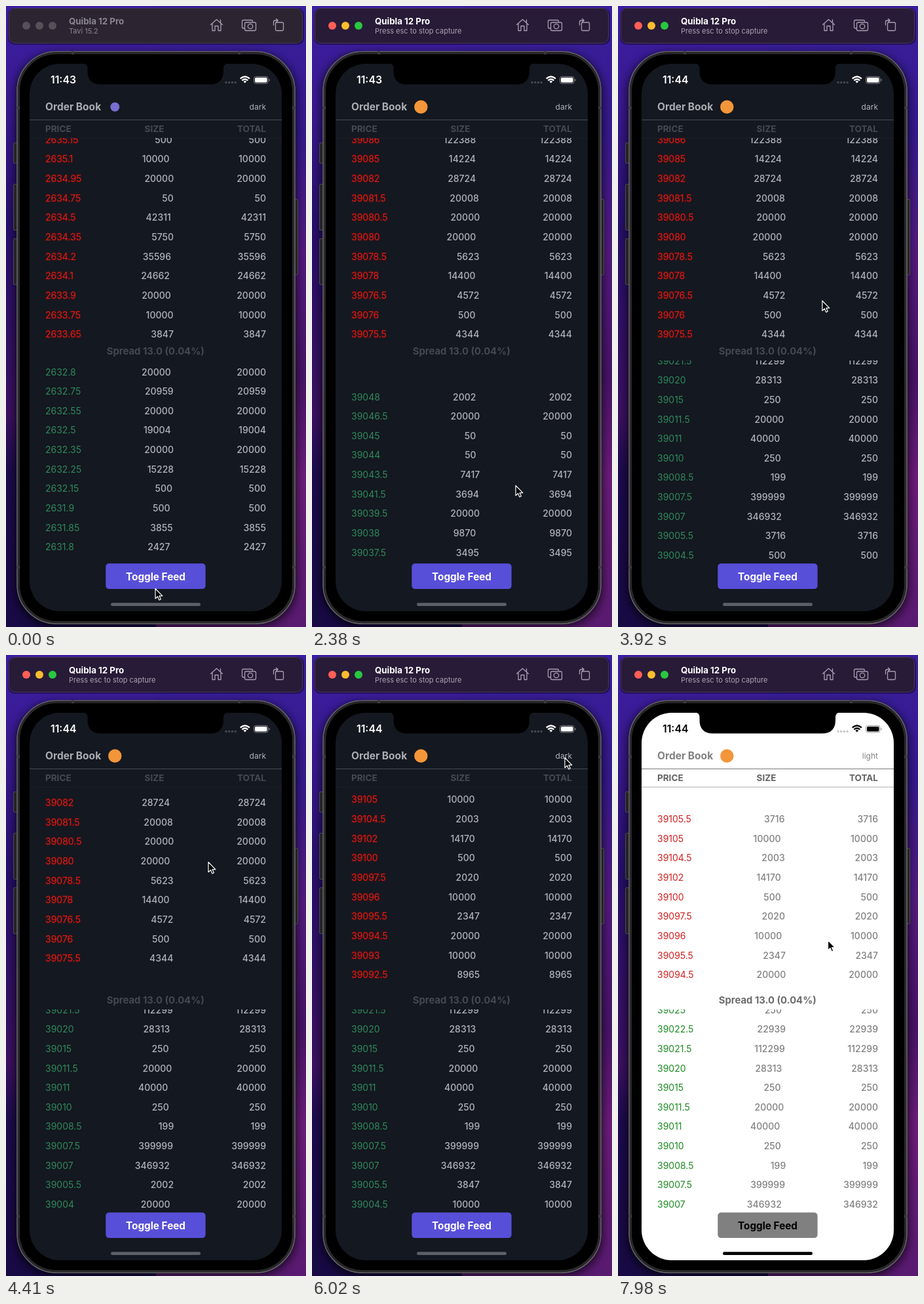
These frames come from a looping animation (458x946 px, 8 s). An HTML page:

```html
<!DOCTYPE html>
<html lang="en">
<head>
<meta charset="utf-8">
<title>Order Book</title>
<style>
  html, body { margin: 0; width: 100%; height: 100%; overflow: hidden; background: #160b3c; }
  svg { display: block; width: 458px; height: 946px; font-family: Inter, Roboto, "Liberation Sans", sans-serif; }
  #app {
    --bg: #141820; --title: #abadb2; --label: #454954; --value: #b1b3b9; --spread: #454851;
    --ask: #ec1a10; --bid: #2f8a5b; --line: #474b55; --line2: #1c202b; --status: #fff;
    --dots: #454850; --home: #5d6067; --btn: #584fd9; --btnText: #fff; --mode: #b1b3b9; --batt: #80848b;
  }
  #app.light {
    --bg: #fff; --title: #808080; --label: #626464; --value: #818181; --spread: #6c6c6c;
    --ask: #d3201e; --bid: #1d8a22; --line: #777b79; --line2: #a9aeab; --status: #000;
    --dots: #c8c8c8; --home: #000; --btn: #808080; --btnText: #000; --mode: #818181; --batt: #999;
  }
  .bold { font-weight: 700; }
  .label { font-size: 13.5px; font-weight: 700; fill: var(--label); }
  .row { font-size: 14px; font-weight: 500; fill: var(--value); }
  .price { font-weight: 400; }
  #asks .price { fill: var(--ask); }
  #bids .price { fill: var(--bid); }
  #app:not(.light) #asks .price { paint-order: stroke; stroke: #f00; stroke-opacity: .06; stroke-width: 4px; stroke-linejoin: round; }
  .end { text-anchor: end; }
  .mid { text-anchor: middle; }
  .icon { fill: none; stroke: #a79eb2; stroke-width: 1.3; stroke-linejoin: round; stroke-linecap: round; }
</style>
</head>
<body>
<svg viewBox="0 0 458 946">
  <defs>
    <linearGradient id="left" x2="0" y2="1">
      <stop offset="0" stop-color="#3b1ea2"/><stop offset=".16" stop-color="#3a1990"/>
      <stop offset=".35" stop-color="#260f6a"/><stop offset=".66" stop-color="#3c1162"/>
      <stop offset=".75" stop-color="#1c0b4e"/><stop offset="1" stop-color="#170a44"/>
    </linearGradient>
    <linearGradient id="right" x2="0" y2="1">
      <stop offset="0" stop-color="#391e9c"/><stop offset=".2" stop-color="#351a8e"/>
      <stop offset=".4" stop-color="#531a7e"/><stop offset=".6" stop-color="#481468"/>
      <stop offset=".76" stop-color="#6c1d7b"/><stop offset="1" stop-color="#581a70"/>
    </linearGradient>
    <clipPath id="askClip"><rect x="36" y="201" width="385" height="309"/></clipPath>
    <clipPath id="bidClip"><rect x="36" y="540" width="385" height="309.5"/></clipPath>
    <filter id="blur" x="-20%" y="-20%" width="140%" height="140%"><feGaussianBlur stdDeviation="7"/></filter>
  </defs>

  <rect width="229" height="946" fill="url(#left)"/>
  <rect x="229" width="229" height="946" fill="url(#right)"/>
  <rect x="14" y="72" width="430" height="874" rx="60" opacity=".65" filter="url(#blur)"/>

  <!-- window bar -->
  <rect x="3" y="3" width="452" height="56" rx="10" opacity=".4"/>
  <rect id="bar" x="4.500" y="3.500" width="448" height="53" rx="9.500" stroke="#46384f"/>
  <g id="lights"><circle cx="31" cy="30" r="6"/><circle cx="51" cy="30" r="6"/><circle cx="71" cy="30" r="6"/></g>
  <text id="device" class="bold" x="96" y="28" font-size="13.300">Quibla 12 Pro</text>
  <text id="hint" x="96" y="42" font-size="11"></text>
  <g class="icon">
    <path d="M312.500 28.500 321.500 20.500 330.500 28.500M327.500 21V25.500M315 27V37.500H319V30.500H324V37.500H328V27"/>
    <path d="M364 34H362.500Q360.500 34 360.500 32V23.500Q360.500 21.500 362.500 21.500H374.500Q376.500 21.500 376.500 23.500"/>
    <rect x="364.500" y="25" width="17" height="12.500" rx="2"/>
    <circle cx="373" cy="31" r="3.700"/>
    <rect x="411.500" y="25" width="12" height="12.500" rx="1.500"/>
    <path d="M408.500 29V24.500Q408.500 22 411 22H415M412.500 19.500 415.200 22 412.500 24.500"/>
  </g>

  <!-- handset -->
  <g fill="#242326" stroke="#4b494e">
    <rect x="11.500" y="208.500" width="7" height="31" rx="1.500"/>
    <rect x="11.500" y="271.500" width="7" height="70" rx="1.500"/>
    <rect x="11.500" y="354.500" width="7" height="70" rx="1.500"/>
    <rect x="438.500" y="294.500" width="7" height="115" rx="1.500"/>
  </g>
  <rect x="17" y="69.500" width="424" height="871.500" rx="60" stroke="#68686a" stroke-width="1.600"/>
  <rect x="19.500" y="72" width="419" height="866.500" rx="57.500" stroke="#29292b" stroke-width="3"/>
  <path d="M16.500 155H21M437 155H441.500M16.500 855H21M437 855H441.500M102 69V73.500M356 69V73.500" stroke="#3c3c3e" stroke-width="4"/>

  <g id="app">
    <rect x="36" y="88" width="385" height="834" rx="46" fill="var(--bg)"/>
    <path d="M118 87.500Q124.500 88 124.500 95V99Q124.500 119.500 145 119.500H311.500Q332 119.500 332 99V95Q332 88 338.500 87.500Z"/>
    <text id="clock" x="68" y="118" font-size="15.800" font-weight="600" fill="var(--status)"></text>
    <path d="M336 116.500h14.500" stroke="var(--dots)" stroke-width="3.600" stroke-linecap="round" stroke-dasharray="0 4.700"/>
    <path d="M357.700 110.700Q364.800 104.300 371.900 110.700M360.300 113.500Q364.800 109.600 369.300 113.500" fill="none" stroke="var(--status)" stroke-width="2.300"/>
    <path d="M362.400 114.900Q364.800 113 367.200 114.900L364.800 117.400Z" fill="var(--status)"/>
    <rect x="378.500" y="107.500" width="21.500" height="10.500" rx="3" fill="none" stroke="var(--batt)"/>
    <rect x="380" y="109" width="18.500" height="7.500" rx="1.700" fill="var(--status)"/>
    <path d="M401.500 111V114.600Q403 114.200 403 112.800T401.500 111Z" fill="var(--batt)"/>

    <text class="bold" x="60" y="159.300" font-size="15.500" fill="var(--title)">Order Book</text>
    <circle id="coin" cx="166.300" cy="153.700"/>
    <text id="mode" class="end" x="397" y="158" font-size="12" fill="var(--mode)"></text>
    <path d="M36 173.500H421" stroke="var(--line)"/>
    <path d="M36 201.200H421" stroke="var(--line2)"/>
    <text class="label" x="60" y="192.300">PRICE</text>
    <text class="label mid" x="226.500" y="192.300">SIZE</text>
    <text class="label end" x="397" y="192.300">TOTAL</text>

    <g clip-path="url(#askClip)"><g id="asks"></g></g>
    <text class="bold mid" x="228.300" y="531" font-size="14.800" fill="var(--spread)">Spread 13.0 (0.04%)</text>
    <g clip-path="url(#bidClip)"><g id="bids"></g></g>

    <g id="button">
      <rect x="152.300" y="849.300" width="152.300" height="38.800" rx="5" fill="var(--btn)"/>
      <text class="bold mid" x="228.500" y="874.500" font-size="15.300" fill="var(--btnText)">Toggle Feed</text>
    </g>
    <rect x="160" y="909.300" width="137" height="4.700" rx="2.350" fill="var(--home)"/>
  </g>

  <path id="cursor" d="M0 0V15.200L3.500 12 5.900 17.400 8.400 16.300 6 11.200H10.800Z" stroke="#fff" stroke-width="1.200" stroke-linejoin="round"/>
</svg>

<script>
const LOOP = 8000, STEP = 70, PITCH = 29.64;
const ASK_Y = 500.2, BID_Y = 557.5;
const $ = id => document.getElementById(id);

function seeded(seed) {
  return () => {
    seed = (seed + 0x6d2b79f5) | 0;
    let x = Math.imul(seed ^ (seed >>> 15), 1 | seed);
    x ^= x + Math.imul(x ^ (x >>> 7), 61 | x);
    return ((x ^ (x >>> 14)) >>> 0) / 2 ** 32;
  };
}

// Orders come in round lots, small lots or odd amounts.
function lotSize(rand) {
  const kind = rand();
  if (kind < 0.4) return 10000 * Math.ceil(rand() * 2);
  if (kind < 0.6) return rand() < 0.5 ? 50 : 500;
  return Math.floor(2000 + 50000 * rand() ** 3);
}

// Price levels from one price upwards (tick > 0) or downwards.
function levels(price, tick, count, seed) {
  const rand = seeded(seed);
  return Array.from({ length: count }, () => {
    const row = [String(+price.toFixed(2)), String(lotSize(rand))];
    price += tick * Math.ceil(rand() * 5);
    return row;
  });
}
const parse = text => text.split(" ").map(pair => pair.split(":"));

// Asks run upwards from the spread, bids downwards.
const ethAsks = levels(2633.65, 0.05, 11, 4);
const ethBids = levels(2632.8, -0.05, 10, 9);
const btcAsks = [
  ...parse("39075.5:4344 39076:500 39076.5:4572 39078:14400 39078.5:5623 39080:20000 39080.5:20000 39081.5:20008 39082:28724 39085:14224 39086:122388"),
  ...levels(39086.5, 0.5, 14, 7)
];
const newAsk = levels(39105.5, 0.5, 1, 2);
const btcBids = [
  ...levels(39048, -0.5, 11, 3),
  ...parse("39030:250 39026:149 39025:250 39022.5:22939 39021.5:112299 39020:28313 39015:250 39011.5:20000 39011:40000 39010:250 39008.5:199 39007.5:399999 39007:346932")
];

const cursorPath = [
  [0, 228, 887.5], [910, 228, 887.5], [1470, 310, 682], [1960, 311, 617], [2380, 311, 730.5],
  [3010, 313, 700], [3430, 313, 603.5], [3850, 312, 455], [4410, 309, 315.5], [5110, 363, 337],
  [5530, 398, 170], [6020, 386, 156.5], [7140, 386, 156.5], [7840, 320.5, 434.5]
];

// Eased 0..1 between two times.
function ease(t, from, to) {
  const u = Math.min(1, Math.max(0, (t - from) / (to - from)));
  return u * u * (3 - 2 * u);
}

function cursorAt(t) {
  const [, ...pos] = cursorPath[0];
  for (let i = 1; i < cursorPath.length; i++) {
    const [from, x0, y0] = cursorPath[i - 1], [to, x1, y1] = cursorPath[i];
    const e = ease(t, from, to);
    pos[0] += (x1 - x0) * e;
    pos[1] += (y1 - y0) * e;
  }
  return pos;
}

// A pull past the end of a list that springs back.
const rubber = (t, from, peak, to) => 38 * (ease(t, from, peak) - ease(t, peak, to));

// Rows added at the head of a list push the rest down.
function askOffset(t) {
  const pushed = (t >= 7140) + (t >= 7980);
  return 431.6 * ease(t, 4690, 5775) - rubber(t, 4060, 4410, 4690) + pushed * PITCH;
}
function bidOffset(t) {
  const pushed = (t >= 7420) + (t >= 7700);
  return rubber(t, 2100, 2380, 2730) - 461.5 * ease(t, 2940, 3700) + pushed * PITCH;
}

function makeText(parent, cls, x) {
  const node = document.createElementNS("http://www.w3.org/2000/svg", "text");
  node.setAttribute("class", cls);
  node.setAttribute("x", x);
  parent.append(node);
  return node;
}

function makePool(id) {
  return Array.from({ length: 26 }, () => ({
    price: makeText($(id), "row price", 60),
    size: makeText($(id), "row end", 250),
    total: makeText($(id), "row end", 397)
  }));
}
const askPool = makePool("asks"), bidPool = makePool("bids");

function setText(node, text) {
  if (node.textContent !== text) node.textContent = text;
}

function drawRows(pool, rows, firstY, pitch) {
  pool.forEach((cells, i) => {
    const y = firstY + i * pitch, shown = i < rows.length && y > 185 && y < 870;
    for (const cell of Object.values(cells)) {
      cell.style.display = shown ? "" : "none";
      cell.setAttribute("y", (y + 5).toFixed(2));
    }
    if (!shown) return;
    const [price, size] = rows[i];
    setText(cells.price, price);
    setText(cells.size, size);
    setText(cells.total, size);
    // Equal gaps between the three cells of a row.
    cells.size.setAttribute("x", 228.5 + cells.price.getComputedTextLength() / 2);
  });
}

function draw(time) {
  const t = Math.floor(time / STEP) * STEP;
  const active = t >= 210, btc = t >= 560, light = t >= 6510;

  $("bar").setAttribute("fill", active ? "#281b37" : "#2c2531");
  const colours = active ? ["#ff5f57", "#febc2e", "#28c840"] : Array(3).fill("#565059");
  [...$("lights").children].forEach((c, i) => c.setAttribute("fill", colours[i]));
  $("device").setAttribute("fill", active ? "#fff" : "#8b858f");
  $("hint").setAttribute("fill", active ? "#aaa2b2" : "#8b858f");
  setText($("hint"), active ? "Press esc to stop capture" : "Tavi 15.2");

  $("app").setAttribute("class", light ? "light" : "");
  setText($("clock"), t < 2660 ? "11:43" : "11:44");
  setText($("mode"), light ? "light" : "dark");
  $("mode").setAttribute("opacity", t >= 6300 && t < 6510 ? 0.6 : 1);
  $("button").setAttribute("opacity", t >= 210 && t < 420 ? 0.6 : 1);
  $("coin").setAttribute("r", btc ? 10.2 : 7);
  $("coin").setAttribute("fill", btc ? "#f3963a" : "#776fd0");

  // The deepest bids keep changing while the feed runs.
  const deepBids = levels(39005.5, -0.5, 2, Math.floor(t / 1400));
  const asks = !btc ? ethAsks : t >= 7980 ? [...btcAsks, ...newAsk] : btcAsks;
  const bids = !btc ? ethBids : [...btcBids, ...deepBids];
  drawRows(askPool, asks, ASK_Y + askOffset(t), -PITCH);
  drawRows(bidPool, bids, BID_Y + bidOffset(t), PITCH);

  $("cursor").setAttribute("transform", `translate(${cursorAt(t).join(" ")})`);
}

const start = performance.now();
function tick() {
  draw((performance.now() - start) % LOOP);
  requestAnimationFrame(tick);
}
tick();
</script>
</body>
</html>
```
